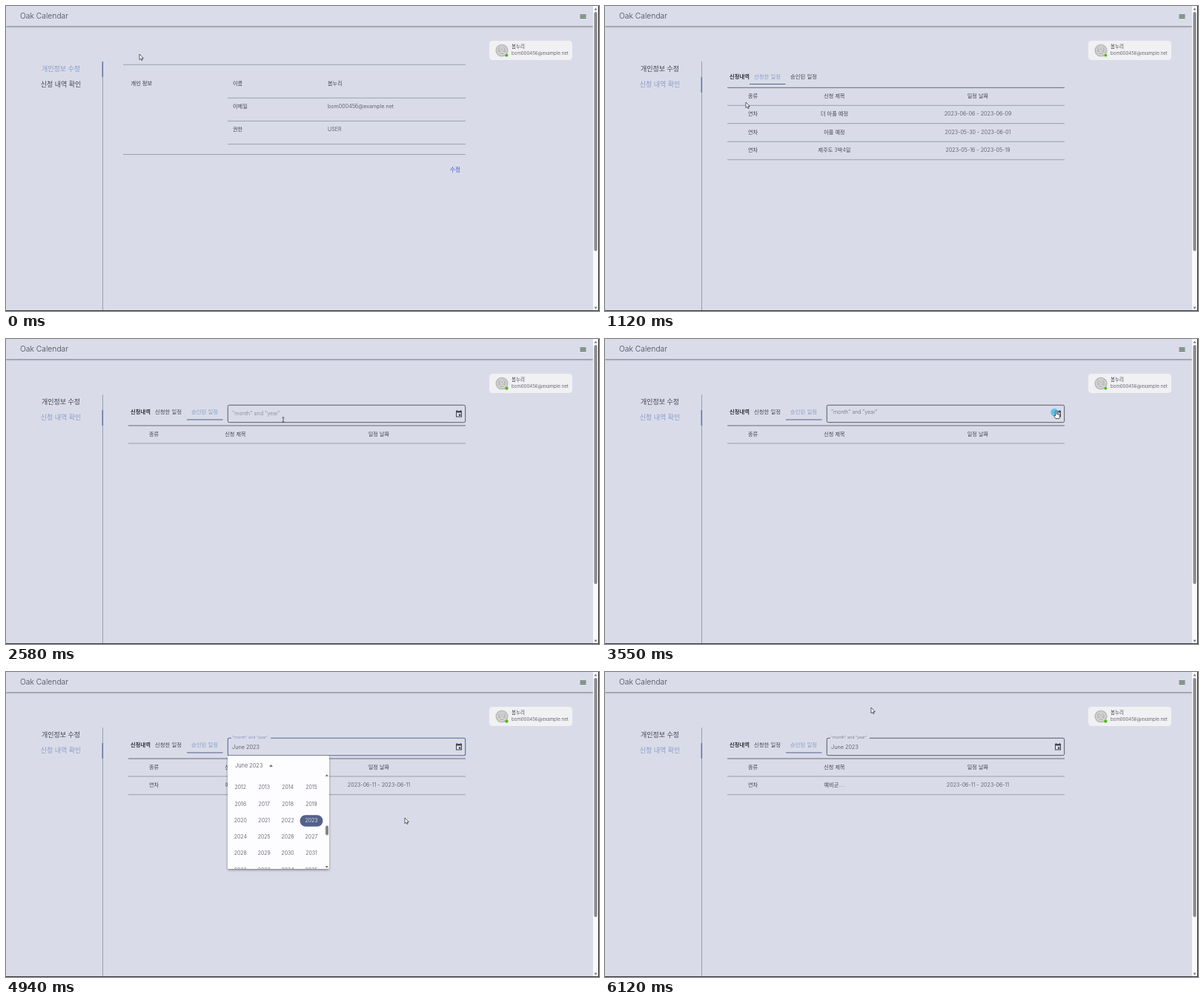
Animation of 800 by 412 pixels, one loop 6.18 s. Source, as an HTML page:

```html
<!DOCTYPE html>
<html lang="ko">
<head>
<meta charset="utf-8">
<style>
html, body { margin: 0; width: 100%; height: 100%; overflow: hidden; background: #d9dce8; }
svg { display: block; width: 800px; height: 412px; }
text { font-family: Inter, "Noto Sans CJK KR", "Noto Sans CJK", sans-serif; font-weight: 300; white-space: pre; }
</style>
</head>
<body>
<svg id="stage" viewBox="0 0 800 412" xmlns="http://www.w3.org/2000/svg"></svg>
<script>
const LOOP = 6180, INK = '#444650', BLUE = '#8b9bc9', NAVY = '#54618a';
const USER = '봄누리', MAIL = 'bom000456@example.net';
const MENU_CLICK = 720, TAB_CLICK = 1750, OPEN_CLICK = 3540, MONTH_CLICK = 4390, CLOSE_CLICK = 5240;

// y is the optical middle of the text
const text = (x, y, s, o = {}) => {
  const { size = 7.2, fill = INK, anchor = 'start', weight = 300, id = '' } = o;
  return `<text id="${id}" x="${x}" y="${y + size * 0.35}" font-size="${size}" fill="${fill}" text-anchor="${anchor}" style="font-weight:${weight}">${s}</text>`;
};
const mid = (x, y, s, o = {}) => text(x, y, s, { anchor: 'middle', ...o });
const rect = (x, y, w, h, fill, extra = '') => `<rect x="${x}" y="${y}" width="${w}" height="${h}" fill="${fill}" ${extra}/>`;
const rule = (x, y, x2 = 620, fill = '#9b9eac') => rect(x, y, x2 - x, 1, fill);
const path = (d, fill, extra = '') => `<path d="${d}" fill="${fill}" ${extra}/>`;
const group = (id, body, extra = '') => `<g id="${id}" ${extra}>${body}</g>`;

const tableRow = (y, kind, title, date) =>
  mid(199.5, y, kind) + mid(309.5, y, title) + mid(503, y, date) + rule(165, y + 12.5);
const tableHead = y => rule(165, y - 11.5, 620, '#686b78') + tableRow(y, '종류', '신청 제목', '일정 날짜');
const tabs = (y, active) =>
  text(168, y, '신청내역', { size: 7.3, weight: 600, fill: '#30323a' }) +
  ['신청한 일정', '승인된 일정'].map((s, i) =>
    mid(219 + i * 49, y, s, { size: 7.4, fill: i === active ? BLUE : INK })).join('') +
  rect(195 + active * 49, y + 10, 48.5, 1, NAVY);

const header = rect(0, 0, 792, 27, '#dadde9', 'filter="url(#barShadow)"') +
  text(19, 13, 'Oak Calendar', { size: 10.3 }) +
  [11.5, 13.6, 15.7].map(y => rect(774.5, y, 8, 1.1, '#38563a')).join('');

const card = rect(652, 47, 112, 26, '#f1f0f3', 'rx="4.5"') +
  '<circle cx="669" cy="60" r="8.6" fill="#bdbdbd"/>' +
  '<g fill="none" stroke="#e8e8ea" stroke-width=".9"><circle cx="669" cy="60" r="6"/><circle cx="669" cy="58.2" r="2.2"/><path d="M664.8 64.2q4.2-4 8.4 0"/></g>' +
  '<circle cx="675.3" cy="66.5" r="2.4" fill="#f1f0f3"/><circle cx="675.3" cy="66.5" r="1.9" fill="#44b700"/>' +
  '<circle id="pulse" cx="675.3" cy="66.5" fill="none" stroke="#44b700" stroke-width=".5"/>' +
  text(682, 54.5, USER, { size: 6.5 }) + text(682, 63.7, MAIL, { size: 6.2 });

const menu = rect(130, 75, 1, 336, '#9a9eb0') + rect(129.6, 75, 1.5, 21, '#61709a', 'id="marker"') +
  mid(74, 85, '개인정보 수정', { size: 9, id: 'menuInfo' }) +
  mid(74, 106, '신청 내역 확인', { size: 9, id: 'menuList' });

const info = rule(158, 78.7) + text(168.5, 104, '개인 정보', { size: 7.3, weight: 500, fill: '#30323a' }) +
  [['이름', USER], ['이메일', MAIL], ['권한', 'USER']].map(([k, v], i) => {
    const y = 104 + i * 31.2;
    return text(306, y, k) + text(434, y, v) + rule(299, y + 19.7);
  }).join('') + rule(158, 200) + text(599, 221, '수정', { size: 7.6, fill: '#4654dc' });

const requested = tabs(95, 0) + tableHead(121.3) +
  tableRow(145.7, '연차', '더 아플 예정', '2023-06-06 - 2023-06-09') +
  tableRow(170.2, '연차', '아플 예정', '2023-05-30 - 2023-06-01') +
  tableRow(194.7, '연차', '제주도 3박4일', '2023-05-16 - 2023-05-19');

const calendarIcon = path('M607 97h8v8.6h-8zM608 99.4v5.2h6v-5.2z', '#45464f', 'fill-rule="evenodd"') +
  rect(608, 96, 1, 2, '#45464f') + rect(613, 96, 1, 2, '#45464f') + rect(611, 101.4, 2.4, 2.4, '#45464f');
const approved = tabs(98.5, 1) + tableHead(128) +
  group('found', tableRow(152.7, '연차', '예비군....', '2023-06-11 - 2023-06-11')) +
  '<rect id="field" x="299.3" y="89.3" width="320.4" height="23.4" rx="2" fill="none"/>' +
  rect(304, 88, 53, 3, '#d9dce8', 'id="notch"') +
  group('label', text(0, 0, '"month" and "year"', { id: 'labelText' })) +
  text(305, 101, '', { size: 7.3, id: 'value' }) + calendarIcon;

const months = 'Jan Feb Mar Apr May Jun Jul Aug Sep Oct Nov Dec'.split(' ');
const monthGrid = rect(351.7, 162, 31, 15.5, NAVY, 'rx="7.7" id="monthPill"') + months.map((m, i) =>
  mid(322.7 + i % 3 * 44.6, 147 + Math.floor(i / 3) * 22.2, m, { id: m })).join('');
const yearGrid = rect(396.5, 193.3, 31, 15.5, NAVY, 'rx="7.7"') + Array.from({ length: 24 }, (_, i) =>
  mid(316.3 + i % 4 * 31.9, 156 + Math.floor(i / 4) * 22.25, 2012 + i, { size: 7, fill: i === 11 ? '#fff' : INK })).join('');
const yearBar = path('M430.8 141h4l-2-3zM430.8 262h4l-2 3z', '#777') + rect(431, 207.5, 4, 13, '#858589', 'rx="2"');
const popup = rect(299, 113, 137, 112, '#fdfcff', 'rx="2" id="paper" filter="url(#popShadow)"') +
  text(309, 126, '', { size: 7.4, id: 'popTitle' }) + path('M-2.5-1.2h5l-2.5 2.5z', '#555', 'id="caret"') +
  group('monthView', monthGrid) + group('yearView', group('', yearGrid, 'clip-path="url(#yearClip)"') + yearBar);

const scrollbar = rect(792, 0, 8, 412, '#fafafb') + rect(793.4, 8, 4.2, 323, '#8b8b8d', 'rx="2.1"') +
  path('M793.5 5.5h4l-2-3zM793.5 406.5h4l-2 3z', '#777') +
  rect(799, 0, 1, 412, '#222') + rect(0, 411, 800, 1, '#33353c');

const pointers =
  path('M0 0V7.6L1.8 6 3 8.6 4.2 8 3.1 5.6H5.4Z', '#fff', 'id="arrow" stroke="#222" stroke-width=".7" stroke-linejoin="round"') +
  path('M-.9.8Q0-.4.9.8V4Q2.1 3.4 2.5 4.3 3.7 3.8 4 4.8 5.1 4.6 5.1 5.8V7.6L4.1 10H-.4L-3 6.4Q-2.8 5-.9 6.4Z', '#fff', 'id="hand" stroke="#222" stroke-width=".75" stroke-linejoin="round"') +
  path('M-1.5-3H1.5M0-3V3M-1.5 3H1.5', 'none', 'id="beam" stroke="#333" stroke-width=".8"');

document.getElementById('stage').innerHTML = `<defs>
  <filter id="barShadow" x="-5%" y="-20%" width="110%" height="170%"><feDropShadow dx="0" dy="1" stdDeviation="1" flood-color="#222" flood-opacity=".55"/></filter>
  <filter id="popShadow" x="-10%" y="-10%" width="120%" height="125%"><feDropShadow dx="0" dy="1.5" stdDeviation="1.7" flood-color="#222" flood-opacity=".5"/></filter>
  <clipPath id="yearClip"><rect x="299" y="137" width="137" height="129"/></clipPath></defs>` +
  rect(0, 0, 800, 412, '#d9dce8') + header + card + menu + group('info', info) + group('requested', requested) +
  group('approved', approved) + group('popup', popup) + scrollbar +
  '<circle id="click" r="5.2" fill="#49bfe6" opacity=".85"/>' + group('pointer', pointers);

const el = Object.fromEntries([...document.querySelectorAll('[id]')].map(n => [n.id, n]));
const show = (name, on) => el[name].style.display = on ? '' : 'none';
const set = (name, attrs) => { for (const k in attrs) el[name].setAttribute(k, attrs[k]); };
const progress = (t, from, length) => {
  const p = Math.min(1, Math.max(0, (t - from) / length));
  return p * p * (3 - 2 * p);
};

// time, x, y of the pointer tip
const route = [
  [0, 180, 65], [90, 180, 65], [560, 74, 109], [790, 74, 109], [1120, 190, 130], [1170, 192, 130],
  [1600, 262, 99], [1960, 262, 99], [2580, 374, 109], [2700, 376, 109], [3280, 608.5, 97.5],
  [3600, 608.5, 97.5], [4180, 402.5, 173.5], [4300, 411, 171], [4430, 411, 171], [4940, 538, 197],
  [5270, 538, 197], [5790, 198, 205], [5900, 171, 211], [6120, 359, 48], [6180, 359, 48]
];
function pointerAt(t) {
  const i = Math.max(1, route.findIndex(k => k[0] > t));
  const [a, b] = [route[i - 1], route[i]];
  const p = progress(t, a[0], b[0] - a[0]);
  return [a[1] + (b[1] - a[1]) * p, a[2] + (b[2] - a[2]) * p];
}
const inside = (x, y, l, top, r, b) => x > l && x < r && y > top && y < b;
function pointerKind(t, x, y) {
  const onApproved = t >= TAB_CLICK + 40;
  if (onApproved && inside(x, y, 600, 90, 620, 112)) return 'hand';
  if (t > OPEN_CLICK && t < CLOSE_CLICK && inside(x, y, 299, 113, 436, 266)) return 'hand';
  if (onApproved && inside(x, y, 299, 89, 600, 113)) return 'beam';
  const onMenu = inside(x, y, 27, 75, 130, 117);
  const onTab = t > 760 && inside(x, y, 195, 85, 293, 109);
  return onMenu || onTab ? 'hand' : 'arrow';
}

function draw(t) {
  const listed = t >= MENU_CLICK + 40, onApproved = t >= TAB_CLICK + 40;
  show('info', !listed);
  show('requested', listed && !onApproved);
  show('approved', onApproved);
  set('menuInfo', { fill: listed ? INK : BLUE });
  set('menuList', { fill: listed ? BLUE : INK });
  set('marker', { y: 75 + 21 * progress(t, MENU_CLICK + 30, 100) });

  const focused = t >= OPEN_CLICK + 30 && t < CLOSE_CLICK + 30;
  const picked = t >= MONTH_CLICK + 20;
  const lift = progress(t, OPEN_CLICK - 10, 90);
  set('field', { stroke: focused ? '#5a6a9c' : '#4b4d59', 'stroke-width': focused ? 1.1 : 0.9 });
  set('label', { transform: `translate(305 ${100.5 - 12 * lift}) scale(${1 - 0.25 * lift})` });
  set('labelText', { fill: focused ? '#7484b5' : lift ? '#686a75' : '#7d808c' });
  show('notch', lift > 0.5);
  el.value.textContent = picked ? 'June 2023' : lift > 0.8 ? 'MMMM YYYY' : '';
  set('value', { fill: picked ? INK : '#a6a9b6' });
  show('found', t >= 4520);

  const fade = progress(t, OPEN_CLICK + 40, 90) * (1 - progress(t, CLOSE_CLICK + 10, 80));
  const scale = 0.8 + 0.2 * fade, years = t >= 4490;
  show('popup', fade > 0);
  set('popup', { opacity: fade, transform: `translate(${299 * (1 - scale)} ${113 * (1 - scale)}) scale(${scale})` });
  set('paper', { height: years ? 153 : 112 });
  el.popTitle.textContent = picked ? 'June 2023' : 'May 2023';
  set('caret', { transform: years ? 'translate(357.5 126.5) scale(1 -1)' : 'translate(354.5 126.5)' });
  show('monthView', !years);
  show('yearView', years);
  set('yearView', { opacity: progress(t, 4470, 90) });
  set('monthPill', { x: picked ? 396.3 : 351.7 });
  set('May', { fill: picked ? INK : '#fff' });
  set('Jun', { fill: picked ? '#fff' : INK });

  const ring = t % 400 / 400;
  set('pulse', { r: 1.6 + 2.2 * progress(ring, 0, 1), opacity: 1 - ring });

  const [x, y] = pointerAt(t), kind = pointerKind(t, x, y);
  set('pointer', { transform: `translate(${x} ${y})` });
  for (const k of ['arrow', 'hand', 'beam']) show(k, k === kind);
  show('click', [MENU_CLICK, TAB_CLICK, OPEN_CLICK, MONTH_CLICK, CLOSE_CLICK].some(c => t >= c - 20 && t < c + 50));
  set('click', { cx: x - 2, cy: y + 1.5 });
}

const start = performance.now();
function tick() {
  draw((performance.now() - start) % LOOP);
  requestAnimationFrame(tick);
}
tick();
</script>
</body>
</html>
```
